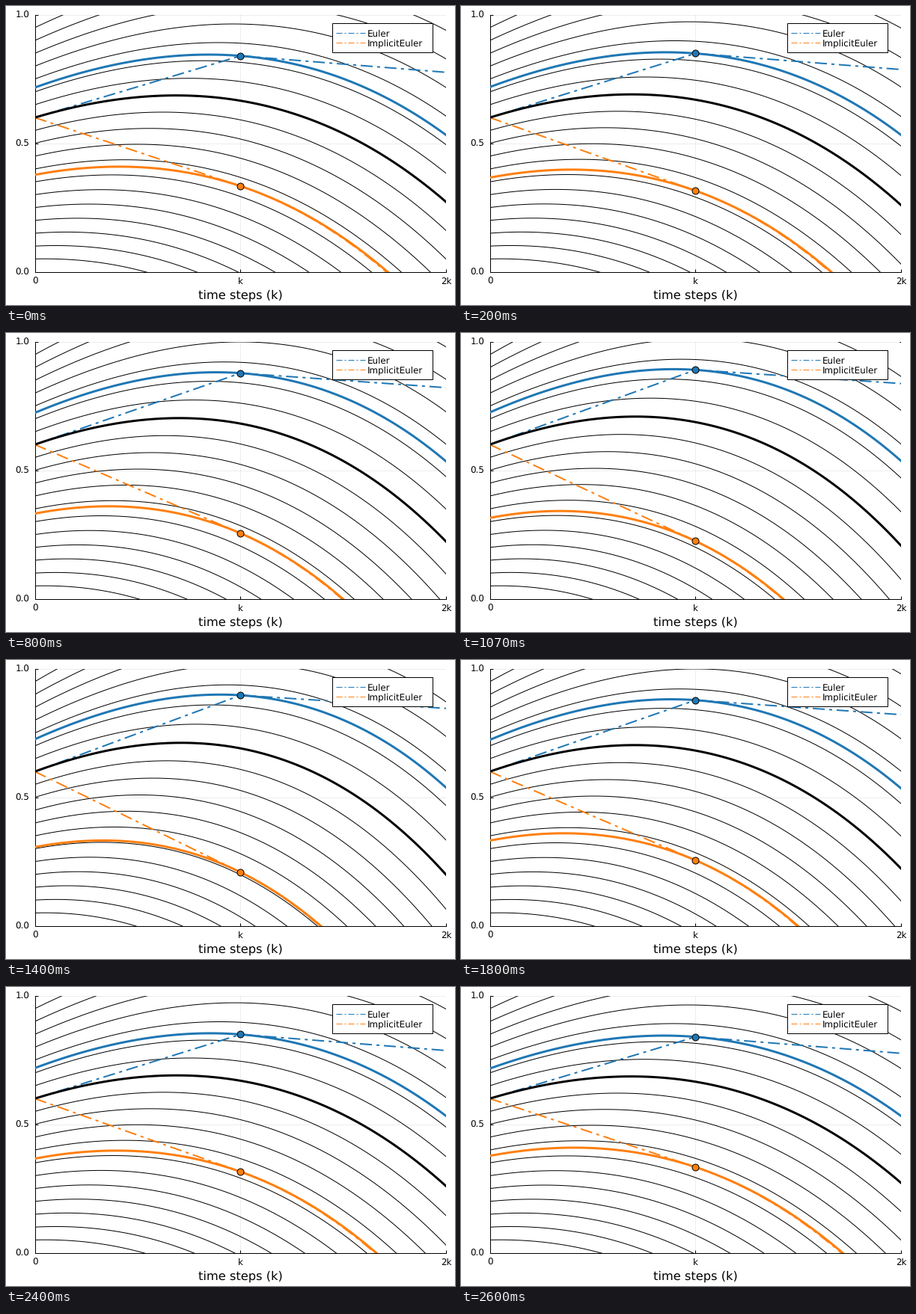
A matplotlib script that plays this animation: 600 by 400 pixels, repeating every 2.67 s.

```python
import numpy as np
import matplotlib.pyplot as plt
from matplotlib.animation import FuncAnimation
from matplotlib.patches import Rectangle

W, H = 600, 400
LEFT, RIGHT, TOP, BOTTOM = 38.6, 588.2, 11.7, 355.6
BLUE, ORANGE = "#1f77b4", "#ff7f0e"
PX = 0.72                      # points per pixel at 100 dpi
DASHDOT = (0, (8, 3, 2, 3))
HALF = 20                      # step sizes on the way out, mirrored back
START = 0.6
TICK = 10                      # ms
LOOP = 2670                    # ms

plt.rcParams["font.family"] = "DejaVu Sans"
plt.rcParams["text.hinting"] = "none"
fig = plt.figure(figsize=(W / 100, H / 100), dpi=100, facecolor="white")
ax = fig.add_axes([LEFT / W, 1 - BOTTOM / H,
                   (RIGHT - LEFT) / W, (BOTTOM - TOP) / H])
ax.set(xlim=(0, 2), ylim=(0, 1), xticks=[0, 1, 2], yticks=[0, 0.5, 1])
ax.set_axisbelow(True)
ax.tick_params(direction="in", length=4 * PX, width=PX,
               labelbottom=False, labelleft=False)
ax.grid(color="black", alpha=0.07, lw=PX)
for side in ("top", "right"):
    ax.spines[side].set_visible(False)
for side in ("left", "bottom"):
    ax.spines[side].set(linewidth=PX, zorder=1)


def label(x, y, text, size=11.85, ha="center"):
    """Text with its baseline at pixel (x, y)."""
    fig.text(x / W, 1 - y / H, text, fontsize=size * PX, ha=ha,
             va="baseline", zorder=20)


for i, text in enumerate(("0", "k", "2k")):
    label(LEFT + i * (RIGHT - LEFT) / 2, 371.6, text)
for i, text in enumerate(("0.0", "0.5", "1.0")):
    label(31.2, BOTTOM + 4.4 - i * (BOTTOM - TOP) / 2, text, ha="right")
label((LEFT + RIGHT) / 2, 392, "time steps (k)", 16.3)

# Legend in pixel coordinates above the plot
top = fig.add_axes([0, 0, 1, 1], zorder=5)
top.set(xlim=(0, W), ylim=(H, 0))
top.axis("off")
top.add_patch(Rectangle((435.7, 23), 134, 39, fc="white", ec="black", lw=PX))
for y, color, name in ((36.4, BLUE, "Euler"), (49.4, ORANGE, "ImplicitEuler")):
    top.plot([441, 480], [y, y], color=color, lw=PX, ls=DASHDOT,
             dash_capstyle="butt")
    label(483.2, y + 4.3, name, ha="left")


def curve(width, color, z, **style):
    return ax.plot([], [], color=color, lw=width * PX, zorder=z, **style)[0]


def dot(color):
    return curve(1, color, 9, marker="o", ms=9 * PX, mec="black", mew=PX)


s = np.linspace(0, 2, 121)
starts = np.arange(1, 21) * 0.05
field = [curve(1, "black", 3) for _ in starts]
euler = curve(2, BLUE, 4, ls=DASHDOT, dash_capstyle="butt")
implicit = curve(2, ORANGE, 4, ls=DASHDOT, dash_capstyle="butt")
exact = curve(3, "black", 6)
euler_flow = curve(3, BLUE, 7)
implicit_flow = curve(3, ORANGE, 7)
euler_dot, implicit_dot = dot(BLUE), dot(ORANGE)


def flow(a, s0, y0):
    """Solution of y' = a (y - s) through (s0, y0)."""
    return s + 1 / a + (y0 - s0 - 1 / a) * np.exp(a * (s - s0))


def implicit_path(a, y, h=0.02):
    """Fine backward steps from s = 1 until the curve leaves the plot."""
    xs, ys = [1.0], [y]
    while ys[-1] > -0.03 and xs[-1] < 2:
        xs.append(xs[-1] + h)
        ys.append((ys[-1] - a * h * xs[-1]) / (1 - a * h))
    return xs, ys


def draw(tick):
    # 15 pictures per second, their starts rounded to whole ticks
    picture = (3 * tick + 1) // 20
    step = min(picture, 2 * HALF - 1 - picture)
    a = 0.4 + 0.1 * step / (HALF - 1)
    for line, y0 in zip(field, starts):
        line.set_data(s, flow(a, 0, y0))
    exact.set_data(s, flow(a, 0, START))

    y1 = START + a * START
    euler.set_data([0, 1, 2], [START, y1, y1 + a * (y1 - 1)])
    euler_flow.set_data(s, flow(a, 1, y1))
    euler_dot.set_data([1], [y1])

    y1 = (START - a) / (1 - a)
    xs, ys = implicit_path(a, y1)
    implicit.set_data([0] + xs, [START] + ys)
    implicit_flow.set_data(s, flow(a, 1, y1))
    implicit_dot.set_data([1], [y1])


anim = FuncAnimation(fig, draw, frames=LOOP // TICK, interval=TICK,
                     init_func=lambda: draw(0), repeat=True, repeat_delay=0)
plt.show()
```
